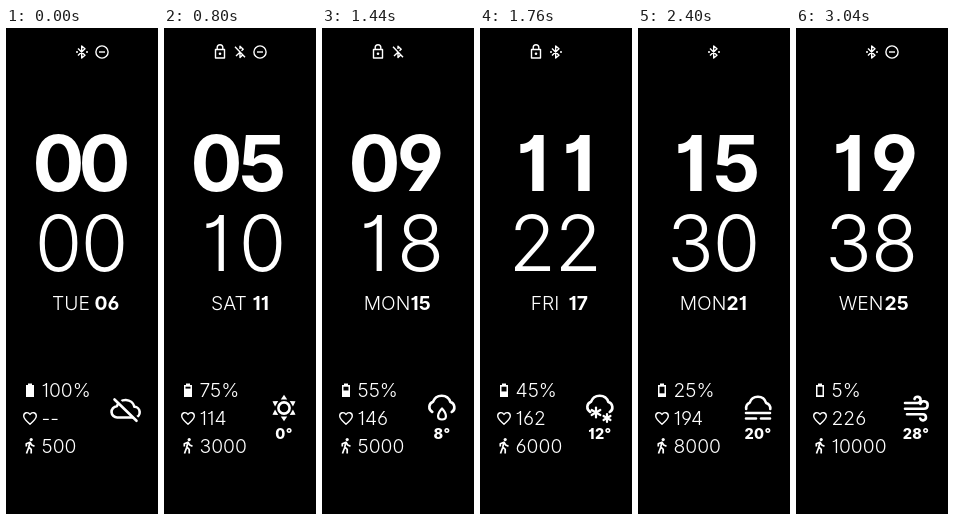
Write an HTML page that moves like this. It is 152 px wide and 486 px high and loops after 3.2 s.

```html
<!DOCTYPE html>
<html lang="en">
<head>
<meta charset="utf-8">
<title>Watch face</title>
<style>
  html, body { margin: 0; width: 100%; height: 100%; overflow: hidden; background: #000; }
  svg { display: block; width: 152px; height: 486px; }
  text {
    fill: #fff; font-family: Inter, "Open Sans", sans-serif; font-size: 19.3px; font-weight: 350;
    font-feature-settings: "cv01", "cv03", "cv04";
  }
  .big { font-size: 77px; text-anchor: middle; }
  .bold { font-weight: 700; }
  .date { font-weight: 650; }
  .mid { text-anchor: middle; }
  .temp { font-size: 14.5px; font-weight: 800; letter-spacing: .4px; text-anchor: middle; }
  .line { fill: none; stroke: #fff; stroke-width: 1.4; stroke-linejoin: round; }
  .thick { fill: none; stroke: #fff; stroke-width: 2.6; stroke-linecap: round; stroke-linejoin: round; }
  .cover { fill: #000; }
  .solid { fill: #fff; }
</style>
</head>
<body>
<svg id="face" viewBox="0 0 152 486"></svg>
<script>
const STEP = 160, COUNT = 20;
const face = document.getElementById('face');
const days = 'TUE THU SUN TUE THU SAT TUE THU SAT MON WEN FRI SUN TUE FRI MON WEN FRI MON WEN'.split(' ');

const pad = n => String(n).padStart(2, '0');
const path = (d, cls = 'line', extra = '') => `<path class="${cls}" d="${d}" ${extra}/>`;
const circle = (x, y, r, cls = 'line') => `<circle class="${cls}" cx="${x}" cy="${y}" r="${r}"/>`;
const text = (s, x, y, cls = '') => `<text class="${cls}" x="${x}" y="${y}">${s}</text>`;
const bigPair = (s, y, cls) => [...s].map((c, k) => text(c, 52.5 + 46 * k, y, 'big ' + cls)).join('');

// Triangular sun rays around a centre, one per angle in degrees
const rays = (x, y, r, angles) => angles.map(a =>
  path(`M0 ${-r - 4.5}l3.2 4.8h-6.4z`, 'solid', `transform="translate(${x} ${y}) rotate(${a})"`)).join('');

const flake = (x, y, r) => [0, 60, 120].map(a =>
  path(`M0 ${-r}V${r}`, 'thick', `transform="translate(${x} ${y}) rotate(${a})" style="stroke-width:2.2"`)).join('');

const openCloud = path('M110.3 384a5.600 5.600 0 0 1 .7-10.200a9.200 9.200 0 0 1 17.400 .200a5.500 5.500 0 0 1 1.300 10', 'thick');

const weather = {
  off: () =>
    path('M111.5 389.5a5.6 5.6 0 0 1-.6-11.3a9.2 9.2 0 0 1 17.6 .6a5.4 5.4 0 0 1 .8 10.7z', 'thick') +
    path('M110 369.5L133 392.5', 'thick', 'style="stroke:#000;stroke-width:3"') +
    path('M108.5 371.5L130.5 392.8', 'thick'),
  partly: () =>
    rays(120, 380, 9, [-90, -45, 45, 90]) + circle(120, 377, 6.6, 'thick') +
    path('M112 391.5a4 4 0 0 1 0-8.2a7 7 0 0 1 13.4-.4a4.3 4.3 0 0 1 2.6 8.6z', 'thick', 'style="fill:#000"'),
  sun: () => circle(120, 380, 5.6, 'thick') + rays(120, 380, 8.8, [0, 60, 120, 180, 240, 300]),
  rain: () => openCloud + path('M120 380.5c-5.5 6-5 11 0 11s5.5-5 0-11z', 'thick', 'style="stroke-width:2.2"'),
  snow: () => openCloud + flake(116, 384.5, 5) + flake(127, 390, 4),
  fog: () =>
    path('M108.2 381a6.2 6.2 0 0 1 3.5-6.3a8.6 8.6 0 0 1 16.4 .2a6 6 0 0 1 4.2 6.1', 'thick') +
    path('M108 385H132M108 390.5H118M123 390.5H132', 'thick'),
  wind: () =>
    path('M109 375H121.5a3.1 3.1 0 1 0-3-4M109 380.700H128a3.700 3.700 0 1 0-3.600-4.700' +
         'M111 386.300H127a3 3 0 1 1-2.800 4.200', 'thick')
};

function weatherName(i) {
  if (i < 2) return 'off';
  if (i < 5) return 'partly';
  if (i < 8) return 'sun';
  if (i < 11) return 'rain';
  if (i < 14) return 'snow';
  return i < 17 ? 'fog' : 'wind';
}

function bluetooth(connected) {
  if (connected) {
    return path('M72 20.5L79 27.3L75.7 30V18L79 20.7L72 27.5') +
      circle(71, 24, 1, 'solid') + circle(81, 24, 1, 'solid');
  }
  return path('M71 18.8L81 29.2M72 28L76 24.3V29.5L78.6 27M76 21V18.3L79.2 21.2L77.5 22.8');
}

const lock = () =>
  path('M51.5 21.5h9v8.5h-9zM53.2 21.5v-2a2.8 2.8 0 0 1 5.6 0v2') + circle(56, 25.7, 1.3, 'solid');

const noDisturb = () => circle(96, 24, 6.1) + path('M93 24h6');

function battery(i) {
  const drained = Math.max(0, Math.floor((i - 1) / 2)) / 9 * 8.5;
  return path('M22 355.5h4v1.5h2v12h-8v-12h2z', 'solid') +
    `<rect class="cover" x="21.5" y="358.7" width="5" height="${drained}"/>`;
}

const heart = () =>
  path('M24 396.2C19.5 392.3 17.7 390.5 17.7 388C17.7 384.5 22 383.3 24 386.5' +
       'C26 383.3 30.3 384.5 30.3 388C30.3 390.5 28.5 392.3 24 396.2z');

const walker = () =>
  circle(25.2, 411.6, 1.6, 'solid') +
  path('M20.3 418.5V415.8L24 414.2L25.7 417L28.5 418.3M23.8 414.5L22.7 419.5L20.5 425.5' +
       'M22.7 419L25.2 421.3V425.5', 'line', 'style="stroke-width:1.7"');

function render(i) {
  const ready = i > 1;
  face.innerHTML = [
    i >= 4 && i < 13 ? lock() : '',
    bluetooth(i < 2 || i >= 11),
    i < 8 || i >= 17 ? noDisturb() : '',
    bigPair(pad(i), 163.3, 'bold'),
    bigPair(pad(2 * i), 243, ''),
    text(days[i], 65, 281.7, 'mid'),
    text(pad(6 + i), 88.5, 281.7, 'date'),
    battery(i), heart(), walker(),
    text(100 - 5 * i + '%', 35.5, 369.2),
    text(ready ? 74 + 8 * i : '--', 35.5, 397.2),
    text(500 + 500 * i, 35.5, 425.2),
    weather[weatherName(i)](),
    ready ? text(2 * i - 10 + '°', 120, 410.7, 'temp') : ''
  ].join('');
}

let shown = -1;
function tick() {
  const i = Math.floor(performance.now() / STEP) % COUNT;
  if (i !== shown) render(shown = i);
  requestAnimationFrame(tick);
}
tick();
</script>
</body>
</html>
```
